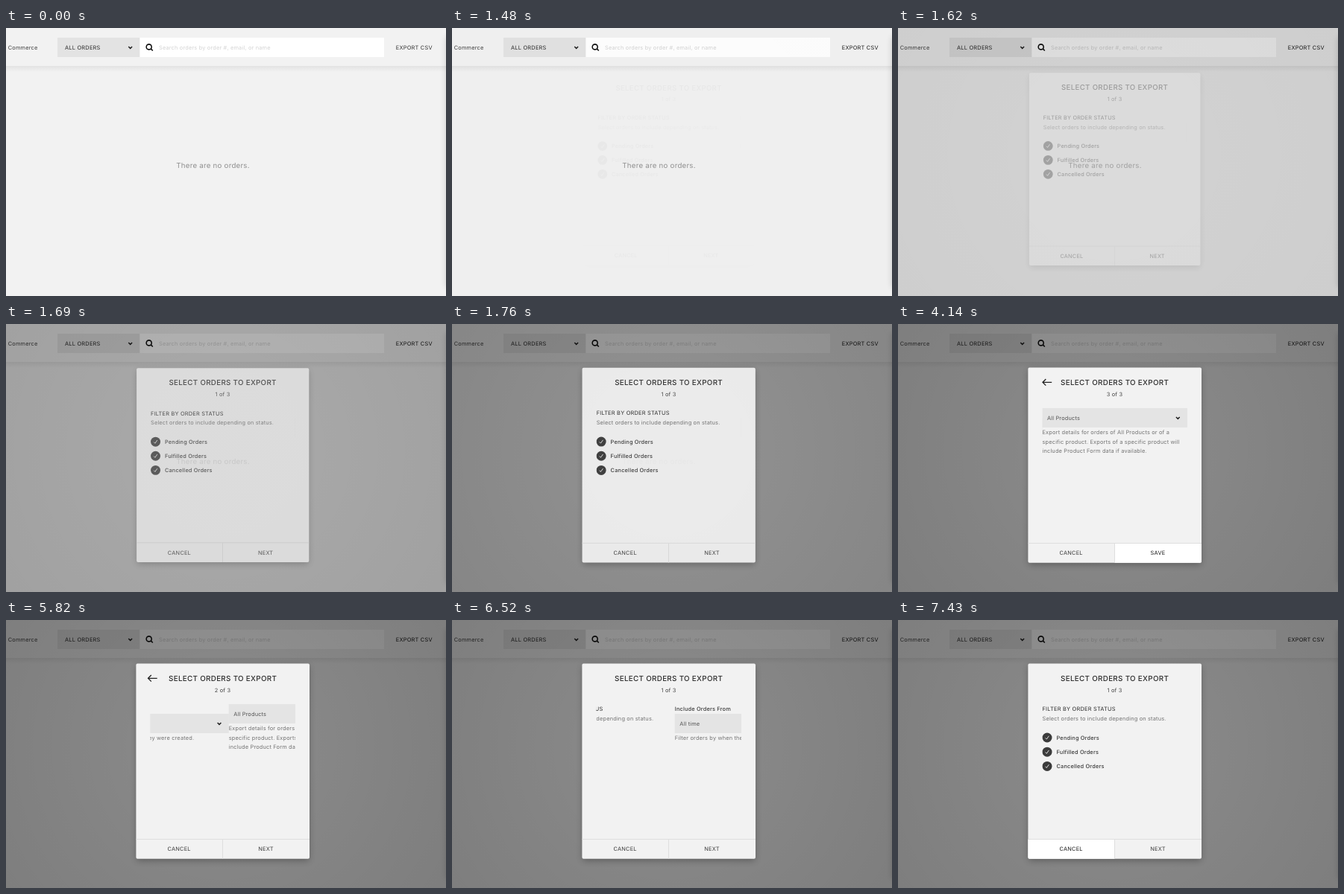
These frames come from a looping animation (590 by 360 pixels, 8000 ms). An HTML page:

```html
<!DOCTYPE html>
<html lang="en">
<head>
<meta charset="utf-8">
<title>Export orders</title>
<style>
html, body { margin: 0; width: 100%; height: 100%; overflow: hidden; background: #f2f2f2; }
svg { display: block; width: 590px; height: 360px; }
text {
  font: 400 7.4px Inter, "Open Sans", sans-serif;
  letter-spacing: .17px;
  text-rendering: geometricPrecision;
  fill: #747474;
  white-space: pre;
}
.caps { letter-spacing: .23px; fill: #2b2b2b; }
.mid { text-anchor: middle; }
.label { font-weight: 500; fill: #3c3c3c; }
.title { font-size: 9.8px; font-weight: 500; letter-spacing: .33px; fill: #2b2b2b; }
.empty { font-size: 9.7px; letter-spacing: .25px; fill: #8f8f8f; }
.line { fill: none; stroke: #222; }
</style>
</head>
<body>
<svg viewBox="0 0 590 360">
  <defs>
    <linearGradient id="drop" x2="0" y2="1">
      <stop stop-color="#000" stop-opacity=".065"/>
      <stop offset="1" stop-color="#000" stop-opacity="0"/>
    </linearGradient>
    <radialGradient id="dim" gradientUnits="userSpaceOnUse" cx="290" cy="170" r="345">
      <stop offset=".3" stop-opacity=".44"/>
      <stop offset="1" stop-opacity=".48"/>
    </radialGradient>
    <filter id="soft" x="-20%" y="-20%" width="140%" height="140%">
      <feGaussianBlur stdDeviation="5"/>
    </filter>
    <filter id="edge" filterUnits="userSpaceOnUse" x="560" y="-20" width="60" height="400">
      <feGaussianBlur stdDeviation="4"/>
    </filter>
    <clipPath id="view"><rect x="193.3" y="100" width="194.7" height="190"/></clipPath>
    <path id="chevron" class="line" d="M-2.4 -1.2L0 1.2L2.4 -1.2" stroke-width="1.5"/>
    <path id="tick" d="M-2.3 .4L-.7 2.1L2.3 -2.2" fill="none" stroke="#f2f2f2" stroke-width=".9"/>
  </defs>

  <rect width="590" height="360" fill="#f2f2f2"/>
  <rect y="51" width="590" height="8" fill="url(#drop)"/>
  <rect x="590" y="12" width="20" height="336" opacity=".16" filter="url(#edge)"/>
  <text x="2.8" y="28.7" style="fill:#444">Commerce</text>
  <rect x="69" y="13" width="110.5" height="26" fill="#e3e3e3"/>
  <text class="caps" x="79" y="28.7" font-weight="500">ALL ORDERS</text>
  <use href="#chevron" x="166.7" y="26.2"/>
  <rect x="179.5" y="13" width="327.5" height="26" fill="#fff"/>
  <g class="line" stroke-width="1.6" style="stroke:#111">
    <circle cx="191.7" cy="25.4" r="3.5"/>
    <path d="M194.2 27.9L196.8 30.5"/>
  </g>
  <text x="205" y="28.9" style="fill:#d4d4d4">Search orders by order #, email, or name</text>
  <text id="export" class="caps" x="522.8" y="28.7">EXPORT CSV</text>
  <text class="empty" x="228.3" y="188">There are no orders.</text>

  <rect id="shade" width="590" height="360" fill="url(#dim)"/>

  <g id="modal">
    <rect x="175.5" y="62" width="230.5" height="261" opacity=".3" filter="url(#soft)"/>
    <rect x="174.4" y="58.5" width="232.6" height="262.3" rx="2" fill="#f2f2f2"/>
    <path id="back" class="line" stroke-width="1.3" d="M206.2 78.3H194.2M198.3 74L194 78.3L198.3 82.6"/>
    <text class="title mid" x="290.6" y="81.5">SELECT ORDERS TO EXPORT</text>
    <text id="step" class="mid" x="290.5" y="96.6" style="fill:#444"></text>

    <g clip-path="url(#view)"><g id="pages">
      <g id="page1">
        <text class="caps" x="193.5" y="122.2">FILTER BY ORDER STATUS</text>
        <text x="193.5" y="135.1">Select orders to include depending on status.</text>
      </g>
      <g id="page2" transform="translate(194.5)">
        <text class="label" x="193.5" y="122.2">Include Orders From</text>
        <rect x="193.5" y="126" width="194.5" height="26" fill="#e4e4e4"/>
        <text x="200" y="141.6" style="fill:#555">All time</text>
        <use href="#chevron" x="375.3" y="139.2"/>
        <text x="193.5" y="160.6">Filter orders by when they were created.</text>
      </g>
      <g id="page3" transform="translate(389)">
        <rect x="193.5" y="113" width="194.5" height="26" fill="#e4e4e4"/>
        <text x="200" y="128.7" style="fill:#555">All Products</text>
        <use href="#chevron" x="375.3" y="126.2"/>
        <text x="193.5" y="147.8">Export details for orders of All Products or of a</text>
        <text x="193.5" y="160.6">specific product. Exports of a specific product will</text>
        <text x="193.5" y="173.4">include Product Form data if available.</text>
      </g>
    </g></g>

    <path id="cancelBg" d="M174.4 295H290.5V320.8H176.4Q174.4 320.8 174.4 318.8Z" fill="#fff"/>
    <path id="nextBg" d="M290.5 295H407V318.8Q407 320.8 405 320.8H290.5Z" fill="#fff"/>
    <path d="M174.4 294.5H407M290.5 294.5V320.8" stroke="#dedede" stroke-width="1"/>
    <text id="cancel" class="caps mid" x="232.1" y="310.3">CANCEL</text>
    <text id="next" class="caps mid" x="348.5" y="310.3"></text>
  </g>
</svg>
<script>
const LOOP = 8000, TICK = 70, PHASE = 10, PAGE = 194.5;
const $ = id => document.getElementById(id);
const SVG = 'http://www.w3.org/2000/svg';

function add(parent, tag, attrs, text) {
  const el = document.createElementNS(SVG, tag);
  for (const k in attrs) el.setAttribute(k, attrs[k]);
  if (text) el.textContent = text;
  parent.append(el);
  return el;
}

const dots = ['Pending', 'Fulfilled', 'Cancelled'].map((name, i) => {
  const y = 158 + i * 19.2, page = $('page1');
  const dot = add(page, 'circle', { cx: 200, cy: y, r: 6.5, fill: '#3b3b3b' });
  add(page, 'use', { href: '#tick', x: 200, y });
  add(page, 'text', { class: 'label', x: 212.5, y: y + 2.6 }, name + ' Orders');
  return dot;
});

// Tracks: [time, value] pairs, linear between them
const OPEN = [[1410, 0], [1480, .03], [1550, .12], [1620, .31], [1690, .7], [1760, .93], [1830, .985], [1900, 1]];
const NEXT = [[2810, 0], [3020, 1], [4420, 1], [4630, 0]];
const CANCEL = [[7290, 0], [7430, 1]];
const BACK = [[5260, 0], [5540, 1]];
// Slides: [start, change of page]
const SLIDES = [[3055, 1], [3780, 1], [5740, -1], [6440, -1]];

function track(keys, t) {
  if (t <= keys[0][0]) return keys[0][1];
  for (let i = 1; i < keys.length; i++) {
    const [t0, a] = keys[i - 1], [t1, b] = keys[i];
    if (t < t1) return a + (b - a) * (t - t0) / (t1 - t0);
  }
  return keys[keys.length - 1][1];
}

function easeOut(t, start) {
  const x = Math.min(1, Math.max(0, (t - start) / 350));
  return 1 - (1 - x) ** 3;
}

function gray(el, from, to, p) {
  const v = Math.round(from + (to - from) * p);
  el.style.fill = `rgb(${v},${v},${v})`;
}

function draw(now) {
  // The screen moves on a fixed tick
  const t = Math.floor((now % LOOP - PHASE) / TICK) * TICK + PHASE;

  $('export').style.fill = t < 500 ? '#333' : t < 1340 ? '#000' : '#1c1c1c';

  const open = track(OPEN, t), s = .98 + .02 * open;
  $('shade').style.opacity = open;
  $('modal').style.opacity = open;
  $('modal').setAttribute('transform', `translate(290.7 189.6) scale(${s}) translate(-290.7 -189.6)`);

  dots[1].setAttribute('fill', t === 2460 ? '#555' : '#3b3b3b');

  let pos = 0, step = 1;
  for (const [start, d] of SLIDES) {
    pos += d * easeOut(t, start);
    if (t >= start) step += d;
  }
  $('pages').setAttribute('transform', `translate(${-PAGE * pos})`);
  $('step').textContent = step + ' of 3';
  $('next').textContent = step === 3 ? 'SAVE' : 'NEXT';

  $('back').style.visibility = step > 1 ? 'visible' : 'hidden';
  $('back').setAttribute('transform', `translate(${-3.5 * track(BACK, t)})`);

  for (const [id, keys] of [['next', NEXT], ['cancel', CANCEL]]) {
    const p = track(keys, t);
    $(id + 'Bg').style.opacity = p;
    gray($(id), 58, 28, p);
  }
}

const begin = performance.now();
function loop() {
  draw(performance.now() - begin);
  requestAnimationFrame(loop);
}
loop();
</script>
</body>
</html>
```
